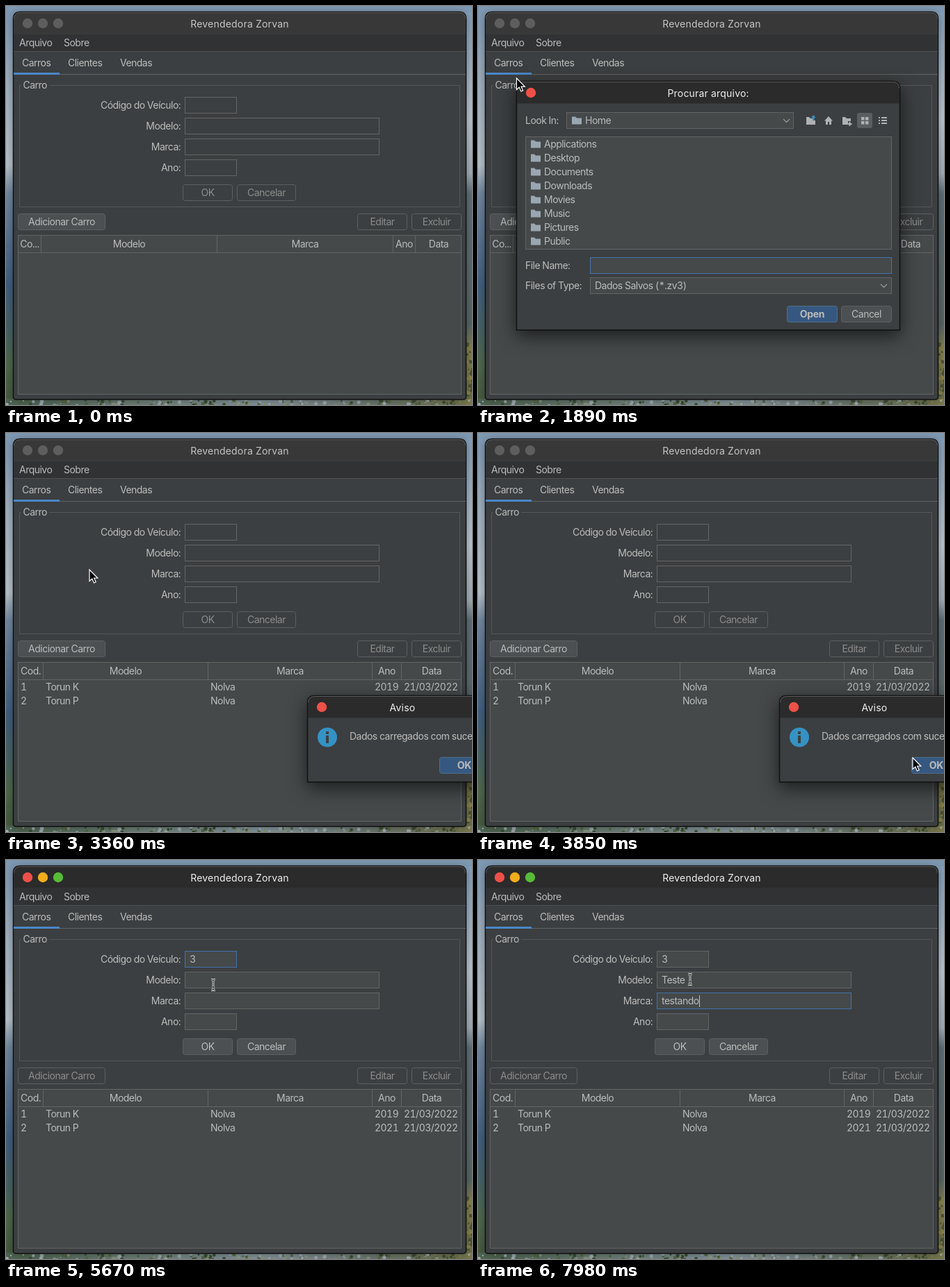
An HTML page for the animation above (8 s loop, 670 by 575 pixels).

```html
<!DOCTYPE html>
<html lang="pt-BR">
<head>
<meta charset="utf-8">
<title>Revendedora Zorvan</title>
<style>
  html, body { margin: 0; width: 100%; height: 100%; overflow: hidden; background: #3c3f41; }
  svg { position: absolute; left: 0; top: 0; }
  text { font: 14px Inter, "Open Sans", sans-serif; font-variant-numeric: tabular-nums; letter-spacing: -.52px; white-space: pre; }
  .title { letter-spacing: .2px; }
  .bold { font-weight: 700; letter-spacing: -.3px; }
  .wide { filter: drop-shadow(0 8px 13px #0009); }
  .soft { filter: drop-shadow(0 3px 7px #0005); }
  .tight { filter: drop-shadow(0 2px 4px #0008); }
</style>
</head>
<body>
<svg width="670" height="575" viewBox="0 0 670 575">
  <defs>
    <linearGradient id="left" x2="0" y2="1">
      <stop offset="0" stop-color="#7d97b2"/><stop offset=".2" stop-color="#a3b2c1"/>
      <stop offset=".4" stop-color="#b9c3cb"/><stop offset=".47" stop-color="#7288a0"/>
      <stop offset=".7" stop-color="#426080"/><stop offset=".82" stop-color="#4a6464"/>
      <stop offset=".9" stop-color="#50694c"/><stop offset="1" stop-color="#45583f"/>
    </linearGradient>
    <linearGradient id="right" x2="0" y2="1">
      <stop offset="0" stop-color="#809cb8"/><stop offset=".28" stop-color="#bcc7d1"/>
      <stop offset=".42" stop-color="#a3afb8"/><stop offset=".47" stop-color="#5f7078"/>
      <stop offset=".8" stop-color="#586766"/><stop offset=".86" stop-color="#85834c"/>
      <stop offset="1" stop-color="#686c48"/>
    </linearGradient>
    <linearGradient id="ground">
      <stop offset="0" stop-color="#4e6654"/><stop offset=".3" stop-color="#73867f"/>
      <stop offset=".55" stop-color="#8a9ca5"/><stop offset=".8" stop-color="#6f7b72"/>
      <stop offset="1" stop-color="#7a7a4c"/>
    </linearGradient>
  </defs>
  <rect width="335" height="575" fill="url(#left)"/>
  <rect x="335" width="335" height="575" fill="url(#right)"/>
  <rect width="670" height="9" fill="#7f99b3"/>
  <rect y="566" width="670" height="9" fill="url(#ground)"/>
  <g id="trees"></g>
  <g id="scene"></g>
  <path id="arrow" d="M0 0V16.5L3.8 13 6.4 19 9.2 17.8 6.6 12H11.8Z" fill="#000" stroke="#fff" stroke-width="1.2"/>
  <g id="beam" fill="none"></g>
</svg>
<script>
const LOOP = 8000, STEP = 70;
const TEXT = '#bbb', DIM = '#8c8c8c', BACK = '#3c3f41', FIELD = '#45494a', LINE = '#646464', BLUE = '#4572ad', PICK = '#4b6eaf';
const APP = 'Revendedora Zorvan';
const CARS = [['1', 'Torun K', 'Nolva', '2019', '21/03/2022'], ['2', 'Torun P', 'Nolva', '2021', '21/03/2022']];
const FOLDERS = ['Applications', 'Desktop', 'Documents', 'Downloads', 'Movies', 'Music', 'Pictures', 'Public'];

// Moments when something happens, in ms
const AT = { active: 350, menu: 1190, hover: 1330, chooser: 1540, pickFolder: 2240, enterFolder: 2450,
  pickFile: 2800, loaded: 2940, notice: 3080, closeNotice: 4270, add: 4620, code: 5040, model: 5740, brand: 7140 };
const PATH = [[70, 250, -22], [490, 157, 22], [560, 157, 22], [1050, 38, 52], [1190, 38, 52], [1400, 40, 70],
  [1540, 42, 74], [1680, 45, 77], [1750, 45, 77], [2310, 112, 250], [2520, 112, 250], [2730, 120, 197], [3360, 120, 197],
  [3850, 625, 468], [4200, 625, 468], [4550, 84, 306], [4620, 84, 306], [4760, 105, 277], [4900, 271, 139],
  [5110, 271, 139], [5320, 275, 152], [5390, 275, 152], [5530, 298, 180], [5670, 298, 180], [5880, 305, 172]];

const scene = document.getElementById('scene');
const arrow = document.getElementById('arrow');
const beam = document.getElementById('beam');
let t = 0, drawn = '';

const from = (a, b = LOOP) => t >= a && t < b;

function label(x, y, s, color = TEXT, anchor = 'start', cls = '') {
  return `<text x="${x}" y="${y + 5}" fill="${color}" text-anchor="${anchor}" class="${cls}">${s}</text>`;
}
const mid = (x, y, s, color, cls) => label(x, y, s, color, 'middle', cls);
const end = (x, y, s, color) => label(x, y, s, color, 'end');

function box(x, y, x2, y2, fill, stroke = LINE, r = 0) {
  return `<rect x="${x + .5}" y="${y + .5}" width="${x2 - x - 1}" height="${y2 - y - 1}" rx="${r}" fill="${fill}" stroke="${stroke}"/>`;
}
const fill = (x, y, w, h, color) => `<rect x="${x}" y="${y}" width="${w}" height="${h}" fill="${color}"/>`;
const dot = (x, y, r, color) => `<circle cx="${x}" cy="${y}" r="${r}" fill="${color}"/>`;
const path = (d, color, stroke = 'none', w = 1) => `<path d="${d}" fill="${color}" stroke="${stroke}" stroke-width="${w}"/>`;

function button(x, y, x2, s, on = true, main = false) {
  return box(x, y, x2, y + 24, main ? '#365880' : on ? '#4c5052' : BACK, main ? '#4c708c' : '#5e6060', 3) +
    mid((x + x2) / 2, y + 12, s, on ? TEXT : DIM, main ? 'bold' : '');
}

function frame(x, y, x2, y2, title, active, body, round) {
  const top = y + 32, r = 10, bottom = round ? `V${y2 - 4}q0 4 -4 4H${x + 4}q-4 0 -4 -4` : `V${y2}H${x}`;
  const shape = `M${x} ${y + r}q0 -${r} ${r} -${r}H${x2 - r}q${r} 0 ${r} ${r}${bottom}Z`;
  return `<g class="${round ? 'soft' : 'wide'}">${path(shape, BACK, '#111', 1.5)}</g>` +
    path(`M${x + .5} ${top}V${y + r}q0 -${r - .5} ${r} -${r - .5}H${x2 - r}q${r - .5} 0 ${r - .5} ${r - .5}V${top}Z`, active ? '#2b2b2b' : '#383838') +
    path(`M${x + 1} ${y + r}q0 -${r - 1} ${r} -${r - 1}H${x2 - r}q${r - 1} 0 ${r - 1} ${r - 1}`, 'none', '#5c5c5c') +
    mid((x + x2) / 2, y + 17, title, active ? '#eee' : '#c4c4c4', 'title') + body;
}

function typed(s, times) {
  return s.slice(0, times.filter(v => t >= v).length);
}

function input(x2, y, s, on, focus, caret) {
  return box(257, y, x2, y + 24, on ? FIELD : BACK, focus ? BLUE : LINE) +
    `<text x="264" y="${y + 17}" fill="${TEXT}" ${focus ? 'id="typed"' : ''}>${s}</text>` +
    (caret ? `<path id="caret" d="M.5 ${y + 4}v17" stroke="${TEXT}"/>` : '');
}

function form() {
  const on = t >= AT.add;
  const code = from(AT.code, AT.model), model = from(AT.model, AT.brand), brand = t >= AT.brand;
  return path('M22 114.5H19.5V289.5H652.5V114.5H62', 'none', '#555759') + label(24.5, 114, 'Carro') +
    ['Código do Veículo:', 'Modelo:', 'Marca:', 'Ano:'].map((s, i) => end(251, 143 + 30 * i, s)).join('') +
    input(332, 131, typed('3', [5320]), on, code, from(AT.code, 5460)) +
    input(537, 161, typed('Teste', [6300, 6440, 6580, 6720, 6720]), on, model, model) +
    input(537, 191, typed('testando', [7350, 7420, 7560, 7630, 7700, 7840, 7910, 7980]), on, brand, brand) +
    input(332, 221, '', on) +
    button(254, 257, 326, 'OK', on) + button(332, 257, 417, 'Cancelar', on) +
    button(17, 299, 143, 'Adicionar Carro', !on) +
    button(505, 299, 577, 'Editar', false) + button(583, 299, 655, 'Excluir', false);
}

function table() {
  const full = t >= AT.loaded;
  const cols = full ? [17, 53, 290, 526, 568, 655] : [17, 50, 303, 556, 588, 655];
  const heads = [full ? 'Cod.' : 'Co...', 'Modelo', 'Marca', 'Ano', 'Data'];
  let s = box(17, 330, 655, 560, FIELD, from(AT.add, AT.code) ? BLUE : LINE) + fill(18, 355, 636, 1, LINE);
  heads.forEach((h, i) => {
    s += mid((cols[i] + cols[i + 1]) / 2 + .5, 343, h);
    if (i) s += fill(cols[i], 331, 1, 24, LINE);
  });
  if (full) CARS.forEach((row, j) => row.forEach((v, i) => s += label(cols[i] + 4, 366 + 20 * j, v)));
  return s;
}

function mainWindow() {
  const active = from(AT.active, AT.chooser) || t >= AT.closeNotice;
  const lights = active ? ['#ed5048', '#f2ae1c', '#57bb38'] : Array(3).fill('#5e5e5e');
  const open = from(AT.menu, AT.chooser);
  return frame(10.5, 8.5, 661.5, 567, APP, active,
    lights.map((c, i) => dot(31 + 22 * i, 25, 7.2, c)).join('') +
    fill(11, 41, 650, 24, '#303234') + fill(11, 65, 650, 1, '#515151') +
    (open ? fill(11, 41, 64, 24, PICK) : '') +
    label(19, 53, 'Arquivo') + label(83, 53, 'Sobre') +
    label(23, 82, 'Carros') + label(89, 82, 'Clientes') + label(164, 82, 'Vendas') +
    fill(11, 98, 650, 1, '#616365') + fill(11, 96, 66, 3, '#4a88c7') +
    form() + table(), true);
}

function menu() {
  const items = [['Abrir', 'Ctrl+O'], ['Salvar', 'Ctrl+S'], ['Sair', 'Ctrl+W']];
  return `<g class="tight">${box(11, 66, 157, 145, '#303234', '#515151')}</g>` +
    items.map(([name, key], i) => {
      const hot = !i && t >= AT.hover, y = 81 + 24 * i;
      return (hot ? fill(12, y - 12, 144, 24, PICK) : '') + label(40, y, name) + end(142, y, key, hot ? TEXT : DIM);
    }).join('');
}

const folder = (x, y) => path(`M${x} ${y - 5.5}h5l2 2h7v9h-14z`, '#9aa7b0');
const chevron = (x, y) => path(`M${x - 4.5} ${y - 2.5}l4.5 4.5 4.5 -4.5`, 'none', '#9a9da0', 1.2);

function tools() {
  const c = '#afb1b3';
  let s = path('M472 160h4l2 2h3v3h4v6h-13z', c) + path('M481 165v-4h-2l3.5 -4 3 4h-2v4z', '#3592c4') +
    path('M498 165.5l6 -6.5 6 6.5h-2v5.5h-3v-4h-2v4h-3v-5.5z', c) +
    path('M524 160h4l2 2h6v4h-4v5h-8z', c) + path('M534.5 167v6M531.5 170h6', 'none', c, 2) +
    `<rect x="545" y="154" width="22" height="22" rx="3" fill="#5a5e60"/>`;
  for (const x of [551, 557]) for (const y of [160, 166]) s += fill(x, y, 4.5, 4.5, c);
  for (const y of [160, 164, 168]) s += fill(576, y, 2, 2, c) + fill(580, y, 8, 2, c);
  return s;
}

function files() {
  if (t < AT.enterFolder) return FOLDERS.map((name, i) => {
    const y = 199 + 20 * i;
    return (i === 3 && t >= AT.pickFolder ? fill(69, y - 10, 173, 20, PICK) : '') + folder(76, y) + label(95, y, name);
  }).join('');
  return (t >= AT.pickFile ? fill(69, 189, 87, 20, PICK) : '') +
    path('M82 192.5h6v13.5h-10v-9.5h4z', '#9aa7b0') + path('M78 195.5l3 -3v3z', '#9aa7b0') + label(95, 199, 'Save.zv3');
}

function chooser() {
  const inList = t >= AT.pickFolder;
  return frame(55.5, 108.5, 606.5, 467, 'Procurar arquivo:', true,
    dot(76, 125, 7.2, '#ed5048') + label(68, 165, 'Look In:') +
    box(127, 153, 454, 177, FIELD) + folder(135, 165) +
    label(154, 165, t < AT.enterFolder ? 'Home' : 'Downloads') + chevron(443.5, 165.5) + tools() +
    box(68, 188, 595, 351, FIELD, inList ? BLUE : LINE) + files() +
    label(68, 374, 'File Name:') + box(161, 362, 595, 386, FIELD, inList ? LINE : BLUE) +
    label(168, 374, t >= AT.pickFile ? 'Save.zv3' : '') +
    label(68, 403, 'Files of Type:') + box(161, 391, 595, 415, FIELD) +
    label(168, 403, 'Dados Salvos (*.zv3)') + chevron(583.5, 403.5) +
    button(444, 432, 517, 'Open', true, true) + button(522, 432, 595, 'Cancel'));
}

function notice() {
  return frame(433.5, 378.5, 706.5, 503, 'Aviso', true,
    dot(454, 395, 7.2, '#ed5048') + dot(462, 438.5, 14, '#3592c4') +
    fill(460, 430, 4, 4, BACK) + fill(460, 436, 4, 11, BACK) +
    label(494, 437, 'Dados carregados com sucesso!') + button(623, 467, 695, 'OK', true, true));
}

function trees() {
  let seed = 7, s = '';
  const rnd = () => (seed = seed * 16807 % 2147483647) / 2147483647;
  const tones = ['#3f5238', '#8d9a86', '#a5b2b6', '#5d6b45'];
  for (let i = 0; i < 150; i++) s += dot(rnd() * 670, 568 + rnd() * 8, 1 + rnd() * 2, tones[i % 4]);
  for (let i = 0; i < 40; i++) s += dot(662 + rnd() * 9, 485 + rnd() * 85, 1 + rnd() * 2, i % 2 ? '#8e8848' : '#4d5537');
  return s;
}

function pointer() {
  const i = PATH.findIndex(p => p[0] > t);
  if (!i) return PATH[0].slice(1);
  if (i < 0) return PATH[PATH.length - 1].slice(1);
  const [t0, x0, y0] = PATH[i - 1], [t1, x1, y1] = PATH[i];
  const u = (t - t0) / (t1 - t0), e = u * u * (3 - 2 * u);
  return [x0 + (x1 - x0) * e, y0 + (y1 - y0) * e];
}

function draw(now) {
  t = Math.floor(now % LOOP / STEP) * STEP;
  const html = mainWindow() + (from(AT.menu, AT.chooser) ? menu() : '') +
    (from(AT.chooser, AT.loaded) ? chooser() : '') + (from(AT.notice, AT.closeNotice) ? notice() : '');
  if (html !== drawn) {
    scene.innerHTML = drawn = html;
    const caret = document.getElementById('caret');
    if (caret) {
      const w = document.getElementById('typed').getComputedTextLength();
      caret.setAttribute('transform', `translate(${Math.round(264 + w)} 0)`);
    }
  }
  const [x, y] = pointer(), typing = t >= 4900;
  for (const el of [arrow, beam]) el.setAttribute('transform', `translate(${x} ${y})`);
  arrow.style.display = typing ? 'none' : '';
  beam.style.display = typing ? '' : 'none';
  requestAnimationFrame(draw);
}

const BEAM = 'M-3 -8Q0 -8 0 -6V6Q0 8 -3 8M3 -8Q0 -8 0 -6M0 6Q0 8 3 8M-2 3H2';
beam.innerHTML = path(BEAM, 'none', '#fff', 2.6) + path(BEAM, 'none', '#111');
document.getElementById('trees').innerHTML = trees();
requestAnimationFrame(draw);
</script>
</body>
</html>
```
